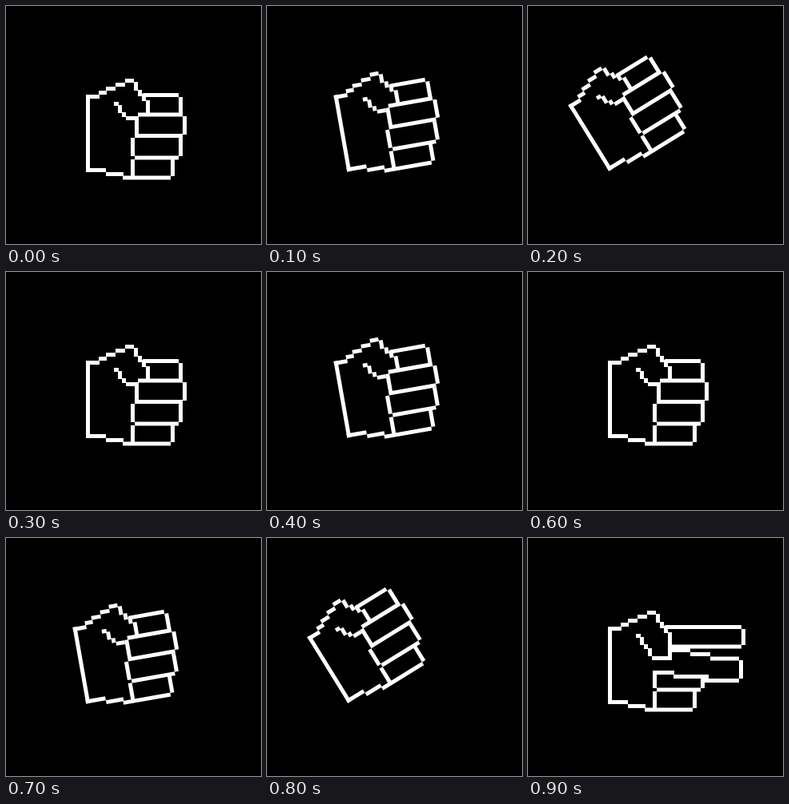
Write an HTML page with a canvas that moves like this. It is 319 px wide and 298 px high and loops after 1900 ms.

```html
<!DOCTYPE html>
<html lang="en">
<head>
<meta charset="utf-8">
<title>Hand game</title>
<style>
html, body { margin: 0; width: 100%; height: 100%; overflow: hidden; background: #000; }
canvas { display: block; }
</style>
</head>
<body>
<canvas id="stage" width="319" height="298"></canvas>
<script>
const ctx = document.getElementById('stage').getContext('2d');
const LOOP = 1900, STEP = 100, SHAKES = 9;
const PEN = 5;
const pivot = { x: 102.5, y: 205.5 };
const poses = [
  { angle: 0, x: 102.5, y: 205.5 },
  { angle: -10, x: 102.3, y: 204.6 },
  { angle: -31.7, x: 102, y: 203.4 }
];

// Bars one pen wide: across from x0 to x1, or down from y0 to y1.
const across = (y, x0, x1) => ctx.fillRect(x0, y, x1 - x0, PEN);
const down = (x, y0, y1) => ctx.fillRect(x, y0, PEN, y1 - y0);

function palm() {
  down(100, 111, 208);
  across(111, 100, 117);
  across(106, 116, 126);
  across(101, 125, 137);
  across(96, 137, 149);
  across(91, 149, 160);
  down(160, 95, 106);
  down(165, 105, 113);
  down(170, 110, 119);
  down(175, 118, 136);
  across(203, 100, 125);
  across(208, 125, 147);
  // thumb crease
  across(120, 135, 141);
  down(140, 124, 134);
  down(145, 133, 139);
}

// Outer corners stay open, as bars meet only at their tips.
function littleFinger() {
  across(187.5, 161, 216);
  down(156, 192, 213);
  down(206, 192, 213);
  across(212.5, 146, 206);
}

function fist() {
  palm();
  across(138, 150, 161);
  down(161, 138, 161);
  across(109, 171, 216);
  down(216, 114, 134);
  across(133.5, 165, 221);
  down(221, 138, 161);
  across(160, 161, 221);
  down(156, 165, 188);
  down(216, 165, 188);
  littleFinger();
}

function scissors() {
  palm();
  down(150, 138, 148);
  across(148, 155, 180);
  down(175, 134, 152);
  across(109, 171, 267);
  down(267, 114, 134);
  across(133.5, 178, 267);
  across(138, 179, 203);
  across(143, 203, 228);
  across(148.5, 228, 264);
  down(264, 153, 176);
  across(176, 218, 264);
  across(166, 156, 183);
  across(171, 182, 226);
  down(156, 166, 188);
  down(216, 175, 188);
  littleFinger();
}

function draw(time) {
  const beat = Math.floor((time % LOOP) / STEP);
  ctx.fillStyle = '#000';
  ctx.fillRect(0, 0, 319, 298);
  ctx.fillStyle = '#fff';
  if (beat >= SHAKES) {
    scissors();
    return;
  }
  const pose = poses[beat % poses.length];
  ctx.save();
  ctx.translate(pose.x, pose.y);
  ctx.rotate(pose.angle * Math.PI / 180);
  ctx.translate(-pivot.x, -pivot.y);
  fist();
  ctx.restore();
}

let start;
function tick(now) {
  start ??= now;
  draw(now - start);
  requestAnimationFrame(tick);
}
draw(0);
requestAnimationFrame(tick);
</script>
</body>
</html>
```
